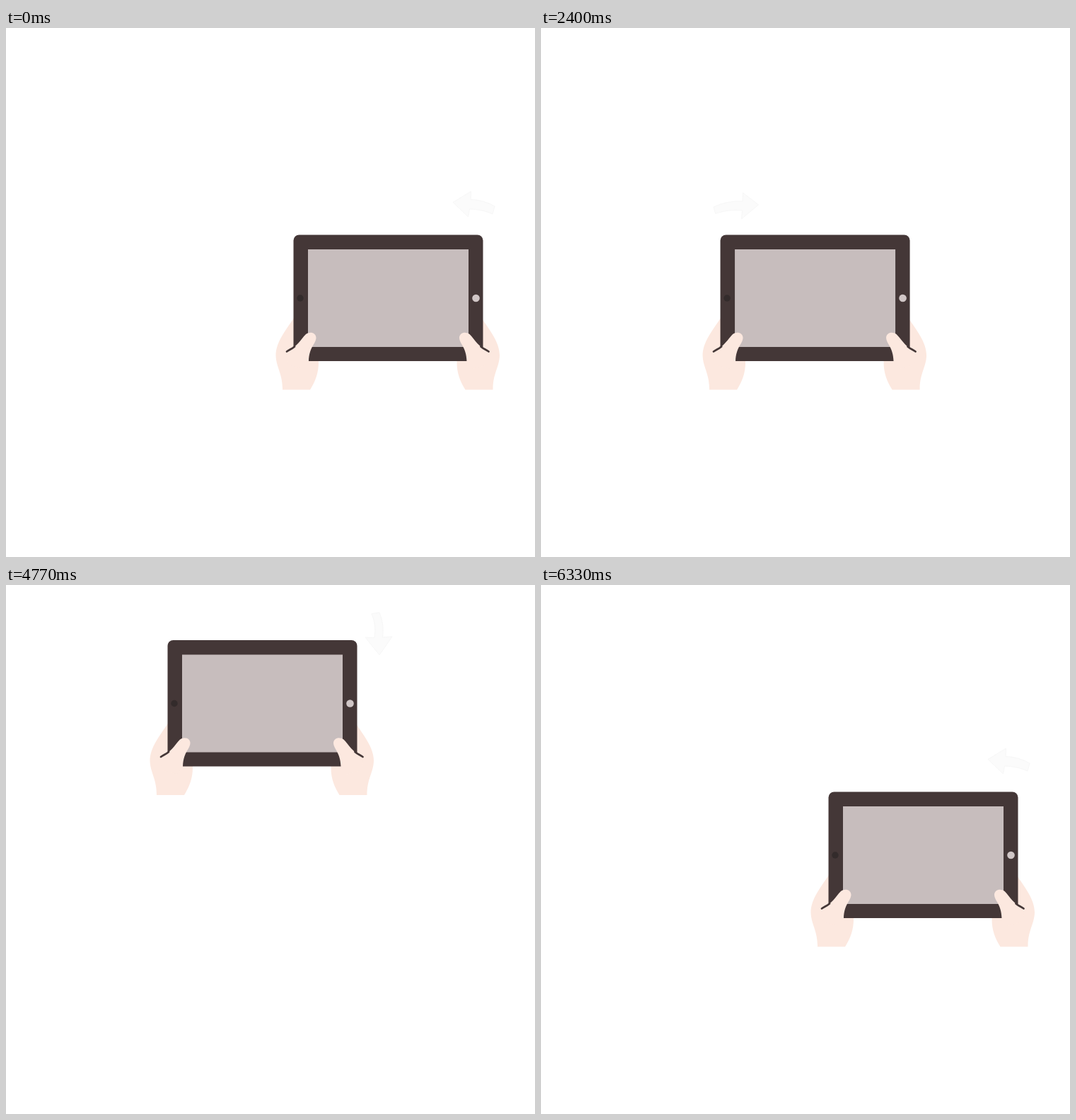
An HTML page that plays this animation: 748x748 px, repeating every 6.53 s.

```html
<!DOCTYPE html>
<html lang="en">
<head>
<meta charset="utf-8">
<title>Tablet moves</title>
<style>
  html, body { margin: 0; height: 100%; overflow: hidden; background: #fff; }
  svg { display: block; width: 748px; height: 748px; }
  .arrow { fill: #fbfbfb; stroke: #f7f7f7; }
</style>
</head>
<body>
<svg id="stage" viewBox="0 0 748 748">
  <defs>
    <path id="palm" fill="#fce8df" d="M407 410C396 427 381.500 444 381.500 463C382 480 391 488 391 511.500H430C437 500 442.500 488 442 470H410Z"/>
    <g id="thumb">
      <path fill="#fce8df" d="M396 458C411 452 417 440 424 433C430 428.500 438.500 431 438.500 438C438 447 428.500 451 428 471.500L420 482L398 476Z"/>
      <path fill="none" stroke="#443737" stroke-width="2.800" stroke-linecap="round" d="M397 457.500C401 454.500 404 454 408 450.500"/>
    </g>
    <g id="tablet">
      <use href="#palm"/>
      <use href="#palm" transform="translate(1079.500) scale(-1 1)"/>
      <rect x="406.500" y="292.500" width="268" height="178.500" rx="8" fill="#443737"/>
      <rect x="427" y="313" width="227" height="138" fill="#c7bdbd"/>
      <circle cx="416" cy="382" r="4.700" fill="#332b2b"/>
      <circle cx="664.500" cy="382" r="5.300" fill="#d0c6c6"/>
      <use href="#thumb"/>
      <use href="#thumb" transform="translate(1079.500) scale(-1 1)"/>
    </g>
    <path id="left" class="arrow" d="M632 246.500L657.500 231L657 242.500Q675 243 691 252L688 263Q672 256 655.500 256L653.500 267Z"/>
    <path id="right" class="arrow" d="M460.500 250L438.500 233L438 245Q416 244 397 253L399.500 262.500Q418 256 437.500 258L436.500 270Z"/>
    <path id="up" class="arrow" d="M697.500 243L682.500 270L694 267.500Q702 284 700 301H710.500Q714 284 708 265.500L720.500 265Z"/>
    <path id="down" class="arrow" d="M695 255L706 253.500Q713 270 710.500 288.500L724 287.500L706 313.500L686 288.500L699 289Q702 271 695 255Z"/>
  </defs>
</svg>
<script>
const LOOP = 6530;
const [RIGHT, LEFT, MIDDLE, TOP, BOTTOM] =
  [[0, 0], [-325, 0], [-177.5, 0], [-178, -214.5], [-178, 205.5]];

// Times count 30 fps ticks; "fade" and "move" are [start, length].
const scenes = [
  { arrow: 'left',  from: RIGHT,  to: LEFT,   fade: [-1, 1],   move: [16.6, 18] },
  { arrow: 'right', from: LEFT,   to: RIGHT,  fade: [48, 5],   move: [63.7, 16] },
  { arrow: 'up',    from: MIDDLE, to: TOP,    fade: [89, 7],   move: [106.6, 18] },
  { arrow: 'down',  from: TOP,    to: BOTTOM, fade: [136, 7],  move: [153.5, 18] },
  { arrow: 'left',  from: RIGHT,  to: RIGHT,  fade: [186, 4],  move: [196, 1] }
];

const stage = document.getElementById('stage');
for (const scene of scenes) {
  stage.insertAdjacentHTML('beforeend', `<g><rect width="748" height="748" fill="#fff"/>
    <g><use href="#tablet"/><use href="#${scene.arrow}"/></g></g>`);
  scene.layer = stage.lastElementChild;
  scene.body = scene.layer.lastElementChild;
}

const progress = (tick, [start, length]) => Math.min(1, Math.max(0, (tick - start) / length));
const ease = p => (1 - Math.cos(Math.PI * p)) / 2;

function draw() {
  const tick = Math.floor(performance.now() % LOOP * 0.03 + 0.15);
  for (const { layer, body, from, to, fade, move } of scenes) {
    const p = ease(progress(tick, move));
    const [x, y] = from.map((v, i) => v + (to[i] - v) * p);
    layer.setAttribute('opacity', progress(tick, fade));
    body.setAttribute('transform', `translate(${x} ${y})`);
  }
  requestAnimationFrame(draw);
}
draw();
</script>
</body>
</html>
```
